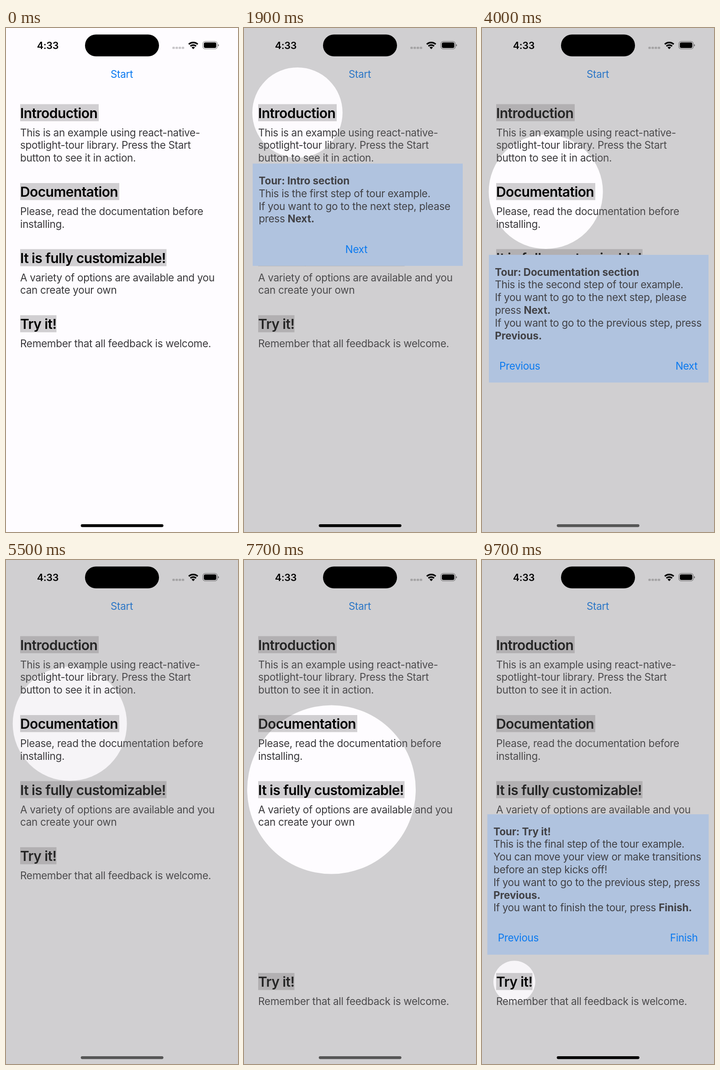
An HTML page that plays this animation: 508x1102 px, repeating every 9.8 s.

```html
<!DOCTYPE html>
<html lang="en">
<head>
<meta charset="utf-8">
<title>Spotlight tour</title>
<style>
  html, body { margin: 0; height: 100%; overflow: hidden; background: #fefcff; }
  svg { display: block; width: 100vw; height: 100vh; }
  text {
    font-family: Inter, "Liberation Sans", sans-serif;
    font-size: 22.5px; letter-spacing: -.32px;
    font-optical-sizing: none; white-space: pre;
  }
  .head { font-size: 30px; font-weight: 600; letter-spacing: -.6px; }
  .body { fill: #39383b; }
  .tip { fill: #414145; }
  .link { fill: #0a79ef; }
  .bold { font-weight: 700; letter-spacing: -.1px; }
  .small { font-size: 17.5px; letter-spacing: 0; }
  .clock { font-size: 21.5px; font-weight: 600; letter-spacing: -.3px; }
  .mid { text-anchor: middle; }
  .end { text-anchor: end; }
</style>
</head>
<body>
<svg viewBox="0 0 508 1102" preserveAspectRatio="none">
  <mask id="hole" maskUnits="userSpaceOnUse" x="0" y="0" width="508" height="1102">
    <rect width="508" height="1102" fill="#fff"/>
    <circle id="spot"/>
  </mask>
  <rect width="508" height="1102" fill="#fefcff"/>
  <text id="start" class="link mid" x="253.5" y="109.3">Start</text>
  <g id="page"></g>
  <g id="last"></g>
  <rect id="shade" width="508" height="1102" fill="#737272" mask="url(#hole)"/>
  <g id="tips"></g>

  <text class="clock" x="67.7" y="46">4:33</text>
  <rect x="173" y="14.3" width="162" height="47.7" rx="23.8"/>
  <g fill-opacity=".21">
    <rect x="364.3" y="41" width="5.4" height="4.8" rx="1.6"/>
    <rect x="371.2" y="41" width="5.4" height="4.8" rx="1.6"/>
    <rect x="378" y="41" width="5.4" height="4.8" rx="1.6"/>
    <rect x="384.8" y="41" width="5.4" height="4.8" rx="1.6"/>
  </g>
  <g fill="none" stroke="#000" stroke-width="3.4">
    <path d="M400.2 35.6a14.4 14.4 0 0 1 19.6 0"/>
    <path d="M403.8 39.8a9 9 0 0 1 12.4 0"/>
  </g>
  <path d="M410 46.3l-3.7-3.8a5.4 5.4 0 0 1 7.4 0z"/>
  <rect x="430.9" y="29.3" width="31.9" height="16.7" rx="5.4" fill="none" stroke="#000" stroke-opacity=".45" stroke-width="1.2"/>
  <rect x="433.2" y="31.6" width="27.3" height="12.1" rx="3.4"/>
  <path d="M464.2 35.2q2.2 .8 2.2 2.5t-2.2 2.5z" fill-opacity=".5"/>
  <rect id="home" x="163.7" y="1085" width="181" height="6.2" rx="3.1"/>
</svg>
<script>
const $ = id => document.getElementById(id);
const text = (cls, x, y, s) => `<text class="${cls}" x="${x}" y="${y}">${s}</text>`;
const bold = s => `<tspan class="bold">${s}</tspan>`;
const lines = (cls, x, y, step, list) =>
  list.map((s, i) => text(cls, x, y + i * step, s)).join("");

// Page sections: heading on a grey highlight, then body lines
const section = (y, width, title, body) =>
  `<rect x="31" y="${y}" width="${width}" height="37.3" fill="#d1cfd2"/>` +
  text("head", 31, y + 30, title) + lines("body", 31, y + 70, 27.75, body);

$("page").innerHTML =
  section(166.5, 172, "Introduction", ["This is an example using react-native-",
    "spotlight-tour library. Press the Start", "button to see it in action."]) +
  section(339, 217, "Documentation", ["Please, read the documentation before", "installing."]) +
  section(483.5, 320.5, "It is fully customizable!", ["A variety of options are available and you",
    "can create your own"]);
$("last").innerHTML = section(628, 79.5, "Try it!", ["Remember that all feedback is welcome."]);

// Tooltips
const blueTip = (x, y, right, list, buttons) => {
  const h = 112.4 + 27.8 * list.length;
  return `<g><rect x="${x}" y="${y}" width="${right - x}" height="${h}" fill="#b0c3df"/>` +
    lines("tip", x + 13.3, y + 45.5, 27.8, list) + buttons(y + h - 28.6) + "</g>";
};
const next = (cls, x, y) => `<g class="next">${text(cls, x, y, "Next")}</g>`;
const goNext = ["If you want to go to the next step, please", "press " + bold("Next.")];
const goBack = ["If you want to go to the previous step, press", bold("Previous.")];

$("tips").innerHTML =
  blueTip(19, 296.5, 479, [bold("Tour: Intro section"),
    "This is the first step of tour example.", ...goNext],
    y => next("link mid", 246, y)) +
  blueTip(15, 496, 496, [bold("Tour: Documentation section"),
    "This is the second step of tour example.", ...goNext, ...goBack],
    y => text("link", 38, y, "Previous") + next("link end", 472, y)) +
  `<g><rect x="22" y="699" width="465" height="229.5" rx="9" fill="#fefcff"/>` +
    text("small bold mid", 254, 727, "Tour: Customization") +
    lines("small", 33, 749.3, 21.75, ["This is the third step of tour example.",
      "If you want to go to the next step, please press " + bold("Next."),
      "If you want to go to the previous step, press", bold("Previous.")]) +
    text("small mid", 151.5, 890.7, "Previous") + next("small mid", 373.5, 890.7) + "</g>" +
  blueTip(11.7, 556, 496.4, [bold("Tour: Try it!"),
    "This is the final step of the tour example.",
    "You can move your view or make transitions", "before an step kicks off!", ...goBack,
    "If you want to finish the tour, press " + bold("Finish.")],
    y => text("link", 34.8, y, "Previous") + text("link end", 472.5, y, "Finish"));

// Spotlights: centre, radius, show and hide times, time the tooltip closes
const steps = [
  { x: 117, y: 185, r: 98.8, show: 1450, hide: 2900, close: 2530 },
  { x: 139.7, y: 358, r: 125, show: 3400, hide: 5350, close: 5260 },
  { x: 191.5, y: 502, r: 184.5, show: 5850, hide: 8840, close: 6870 },
  { x: 70.8, y: 922, r: 45.8, show: 9340, hide: 1e5, close: 1e5 }
];
const tips = [...$("tips").children];

const ease = (t, from, dur) => {
  const p = Math.min(1, Math.max(0, (t - from) / dur));
  return p < .5 ? 2 * p * p : 1 - 2 * (1 - p) ** 2;
};
const set = (el, attrs) => {
  for (const k in attrs) el.setAttribute(k, attrs[k]);
};

function draw(t) {
  set($("start"), { opacity: 1 - .67 * (ease(t, 670, 100) - ease(t, 1000, 250)) });
  set($("shade"), { "fill-opacity": .324 * ease(t, 675, 490) });
  set($("last"), { transform: `translate(0 ${275 * ease(t, 6850, 800)})` });

  const grey = 86 * (ease(t, 2950, 400) - ease(t, 8400, 400));
  set($("home"), { fill: `rgb(${grey},${grey},${grey})` });

  const now = steps.findLast(s => t >= s.show) || steps[0];
  set($("spot"), {
    cx: now.x, cy: now.y, r: now.r,
    "fill-opacity": ease(t, now.show, 500) - ease(t, now.hide, 500)
  });

  steps.forEach((s, i) => {
    set(tips[i], { opacity: ease(t, s.show + 20, 300) - ease(t, s.close, 230) });
    const button = tips[i].querySelector(".next");
    if (button) set(button, { opacity: 1 - .78 * ease(t, s.close - 120, 50) });
  });
}

const begin = performance.now();
function tick() {
  draw((performance.now() - begin) % 9800);
  requestAnimationFrame(tick);
}
tick();
</script>
</body>
</html>
```
